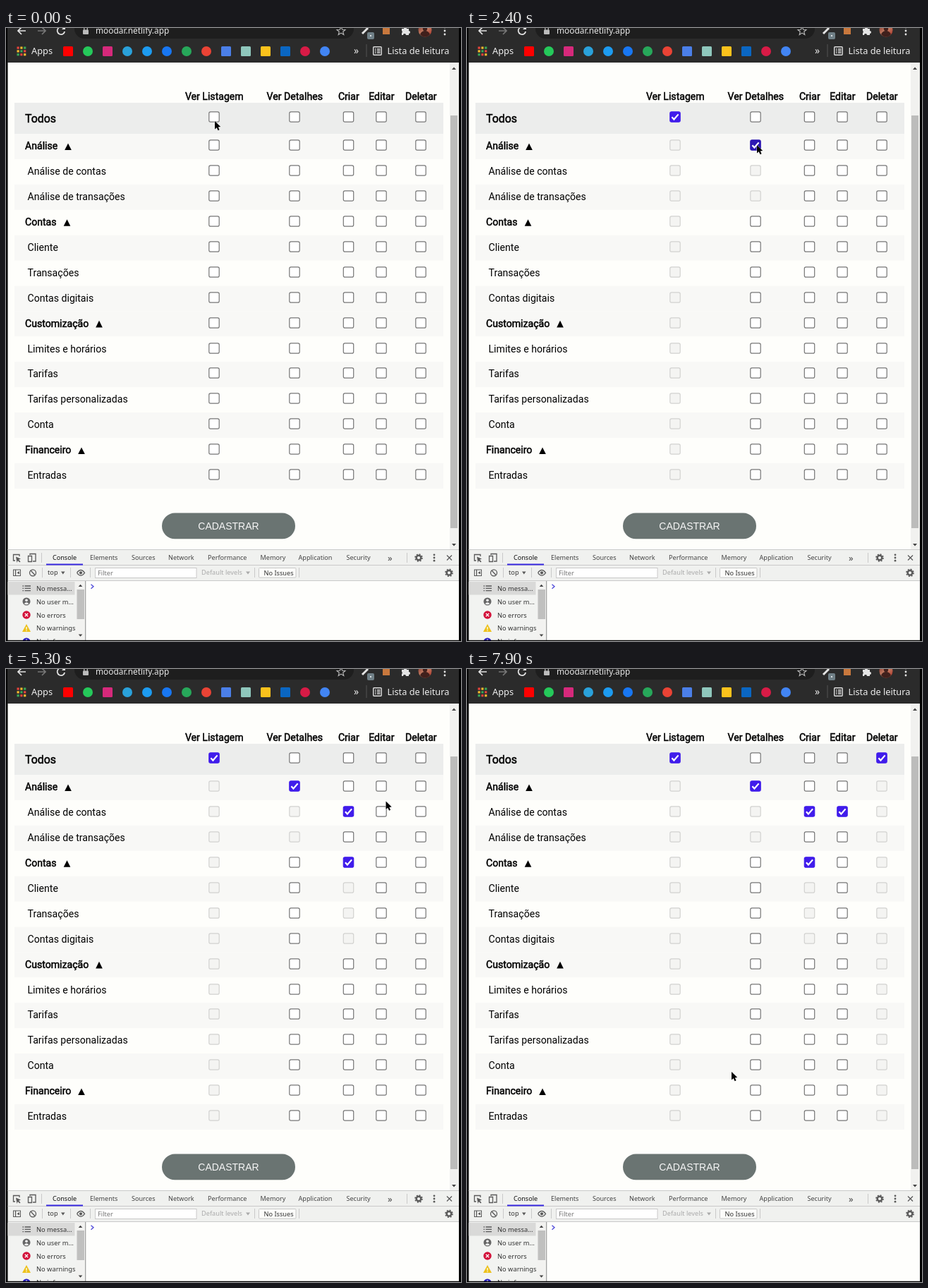
An HTML page that plays this animation: 645 by 869 pixels, repeating every 8 s.

```html
<!DOCTYPE html>
<html lang="pt">
<head>
<meta charset="utf-8">
<title>Permissões</title>
<style>
  html, body { margin: 0; width: 100%; height: 100%; overflow: hidden; background: #000; }
  svg { display: block; width: 645px; height: 869px; }
  text { white-space: pre; }
  .ui { font-family: "Noto Sans", "Open Sans", sans-serif; }
  .page { font: 14.1px Roboto, sans-serif; fill: #000; }
  .strong { stroke: #000; stroke-width: .5px; }
  .box { fill: #fff; stroke: #767676; stroke-width: 1.2px; }
  .box.hover { stroke: #4f4f4f; }
  .box.press { stroke: #a5a5a5; }
  .box.off { fill: #f4f4f2; stroke: #d2d2d0; }
  .box.on { fill: #401ceb; stroke: #401ceb; }
  .box.on.hover { fill: #2d17b3; stroke: #2d17b3; }
  .line { fill: none; stroke-width: 1.3px; }
</style>
</head>
<body>
<svg id="stage" viewBox="0 0 645 869"></svg>
<script>
const stage = document.getElementById('stage');
const columns = [295, 409, 485.5, 532, 588];
const headings = ['Ver Listagem', 'Ver Detalhes', 'Criar', 'Editar', 'Deletar'];
const arrowX = { 'Análise': 88, 'Contas': 86.5, 'Customização': 132, 'Financeiro': 107 };
const rows = ['Análise', 'Análise de contas', 'Análise de transações', 'Contas', 'Cliente',
  'Transações', 'Contas digitais', 'Customização', 'Limites e horários', 'Tarifas',
  'Tarifas personalizadas', 'Conta', 'Financeiro', 'Entradas'];
const whiteRows = [1, 3, 5, 8, 10, 12];
const boxY = row => row ? Math.round(166.2 + 35.92 * (row - 1)) : 126;

const rect = (x, y, w, h, fill, more = '') =>
  `<rect x="${x}" y="${y}" width="${w}" height="${h}" fill="${fill}" ${more}/>`;
const dot = (x, y, r, fill, more = '') => `<circle cx="${x}" cy="${y}" r="${r}" fill="${fill}" ${more}/>`;
const path = (d, fill, more = '') => `<path d="${d}" fill="${fill}" ${more}/>`;
const line = (d, color, more = '') => `<path class="line" d="${d}" stroke="${color}" ${more}/>`;
const text = (x, y, label, cls, more = '') => `<text x="${x}" y="${y}" class="${cls}" ${more}>${label}</text>`;
const ui = (x, y, label, size, fill = '#333') => text(x, y, label, 'ui', `font-size="${size}" fill="${fill}"`);
const dots = (x, y, gap, fill) => [-1, 0, 1].map(k => dot(x, y + k * gap, 1.4, fill)).join('');
const gear = (x, y) => dot(x, y, 3.3, 'none', 'stroke="#5a5a5a" stroke-width="2.4"') +
  dot(x, y, 5, 'none', 'stroke="#5a5a5a" stroke-width="1.6" stroke-dasharray="2 1.93"');

function browserBar() {
  const white = '#e4e4e4';
  let out = rect(2, 0, 640, 49, '#2b2b2b') + rect(97, -14, 396, 29, '#1e1e1e', 'rx="14"');
  out += line('M28 4H17M22 -1L17 4L22 9', white, 'style="stroke-width:1.7px"');
  out += line('M45 4H56M51 -1L56 4L51 9', '#777', 'style="stroke-width:1.7px"');
  out += line('M82.5 1A5.3 5.3 0 1 0 83.2 5', white, 'style="stroke-width:1.7px"') + path('M79 2H84V-3Z', white);
  out += rect(109, 2.5, 8, 6.5, '#bbb', 'rx="1"') + line('M110.8 3V0A2.3 2.3 0 0 1 115.3 0V3', '#bbb');
  out += ui(127, 8.3, 'moodar.netlify.app', 11.9, '#e8e8e8');
  out += path('M475 -2L476.7 2.2L481 2.5L477.7 5.2L478.8 9.5L475 7.1L471.2 9.5L472.3 5.2L469 2.5L473.3 2.2Z',
    'none', 'stroke="#bbb" stroke-width="1.1"');
  out += line('M505 8L513 0', white, 'style="stroke-width:3px"') + rect(512, 6, 10, 10, '#708087', 'rx="2"') + dot(517, 11, 1, '#fff');
  out += rect(534, 0, 10, 9, '#c8783d');
  out += path('M561 1H564A2 2 0 1 1 568 1H571V4A2 2 0 1 1 571 8V10H567A2 2 0 0 0 563 10H561V7A2 2 0 0 0 561 4Z', white);
  out += dot(594, 3, 9.5, 'url(#portrait)') + path('M587 9Q589 4 594 4T601 9Q598 12.5 594 12.5T587 9', '#40201c') + dot(594, 1, 3.2, '#40201c');
  out += dots(622, 4, 5, white);

  const gridColors = ['#e8453c', '#f9bb2d', '#3aa757'];
  for (let i = 0; i < 9; i++)
    out += rect(15.5 + i % 3 * 4.8, 26.5 + Math.floor(i / 3) * 4.8, 3.2, 3.2, gridColors[(i + Math.floor(i / 3)) % 3]);
  out += ui(36, 37, 'Apps', 12.8, '#eee');
  const marks = ['#f00s', '#25c95a', '#d6297bs', '#2aa1da', '#1d9bf0', '#1877f2', '#27a85a', '#ea4335',
    '#4b7fe8s', '#8fc7bcs', '#fbc21cs', '#0a66c2s', '#d81b46', '#4285f4'];
  marks.forEach((mark, i) => {
    const x = 88 + i * 28, color = mark.replace(/s$/, '');
    out += mark.endsWith('s') ? rect(x - 7, 26, 14, 14, color, 'rx="1.5"') : dot(x, 33, 7, color);
  });
  out += ui(493, 37, '»', 14, '#eee') + rect(510.5, 23, 1, 18, '#555');
  out += rect(520.7, 26.7, 11.5, 11.5, 'none', 'rx="1" stroke="#ddd" stroke-width="1.4"') +
    line('M523 30H524.5M526 30H530.5M523 32.5H524.5M526 32.5H530.5M523 35H524.5M526 35H530.5', '#ddd');
  return out + ui(540.5, 37, 'Lista de leitura', 12.75, '#eee');
}

function page() {
  let out = rect(2.5, 49, 639.5, 691, '#fefefb') + rect(12, 106, 608, 44, '#ecedec');
  headings.forEach((label, i) => out += text(columns[i] + .3, 102, label, 'page strong', 'text-anchor="middle"'));
  out += text(27, 134, 'Todos', 'page strong', 'style="font-size:15.9px"');
  rows.forEach((label, i) => {
    const top = 150 + 35.92 * i, base = top + 22.2, peak = arrowX[label];
    if (!whiteRows.includes(i)) out += rect(12, top, 608, 35.92, '#f8f8f6');
    out += text(peak ? 27 : 30.5, base, label, peak ? 'page strong' : 'page');
    if (peak) out += path(`M${peak - 4.8} ${base + .8}L${peak} ${base - 8.8}L${peak + 4.8} ${base + .8}Z`, '#000');
  });
  out += rect(221, 687.5, 189, 36.8, '#6a7472', 'rx="18.4"') +
    text(315.5, 710.6, 'CADASTRAR', '', 'text-anchor="middle" font-family="Liberation Sans, Arial, sans-serif" font-size="14" fill="#f6f6f6"');
  return out + rect(629, 49, 13, 691, '#f1f1ef') + rect(630, 124, 10, 585, '#bcbcbb') +
    path('M632 59H638L635 55.5ZM632 731H638L635 734.5Z', '#444');
}

function devtools() {
  const grey = '#5a5a5a', rule = '#c9c9c9';
  let out = rect(2.5, 739.5, 639.5, 44, '#f0f1ef') + rect(2.5, 739, 639.5, 1, rule) +
    rect(2.5, 761, 639.5, 1, rule) + rect(2.5, 783, 639.5, 1, rule);
  out += line('M19 749V746.5H10.5V755H13', grey) + path('M14 749.5L21 752.5L18 753.7L20.5 756.3L19.3 757.5L16.7 755L15.5 758Z', grey);
  out += line('M34 747V745.5H42V756H38M31.5 748.5H36.5V756.5H31.5Z', grey) + rect(50, 744, 1, 14, rule);
  const tabs = { Console: 66, Elements: 119, Sources: 178, Network: 230, Performance: 286, Memory: 360.5, Application: 414.5, Security: 482.5 };
  for (const name in tabs) out += ui(tabs[name], 754.3, name, 9.1, name === 'Console' ? '#111' : '#444');
  out += rect(57, 759.5, 52, 2, '#3a2be0') + ui(541, 755.5, '»', 13, '#444') + gear(585, 751) +
    rect(568, 744, 1, 14, rule) + dots(607, 751, 4.2, grey) + line('M625 747.5L632 754.5M632 747.5L625 754.5', grey);

  out += rect(10.5, 768, 10, 8.5, 'none', `stroke="${grey}"`) + line('M13.5 768V776.5', grey) + path('M19 770V774.5L15.5 772.2Z', grey);
  out += dot(38, 772.3, 4.5, 'none', `stroke="${grey}" stroke-width="1.3"`) + line('M35 769L41 775.5', grey);
  out += [51, 91, 119, 352, 415].map(x => rect(x, 765, 1, 14, rule)).join('');
  out += ui(59, 775.3, 'top', 9.2) + path('M78 770.5H83.5L80.75 774.5Z', grey);
  out += path('M100.5 772.3Q106 764.5 111.5 772.3Q106 780 100.5 772.3', 'none', `stroke="${grey}" stroke-width="1.3"`) + dot(106, 772.3, 2.1, grey);
  out += rect(126.5, 765.5, 143.5, 14, '#fff', `stroke="${rule}"`) + ui(130, 775.8, 'Filter', 9.2, '#757575');
  out += ui(277, 775.3, 'Default levels', 9.2, '#aaa') + path('M340 770.5H346L343 774.5Z', '#aaa');
  out += rect(358.5, 765.5, 52.5, 13.5, '#fcfcfa', `rx="1" stroke="${rule}"`) + ui(365.5, 775.5, 'No Issues', 9.2) + gear(628, 772.3);

  out += rect(2.5, 784, 110, 84, '#f2f3f1') + rect(2.5, 785, 95, 18.5, '#d9d9d8') + rect(113, 784, 529, 84, '#fefefc') + rect(112.5, 784, 1, 84, rule);
  ['No messa…', 'No user m…', 'No errors', 'No warnings', 'No info'].forEach((label, i) =>
    out += ui(43, 798 + i * 18.8, label, 9.3));
  out += line('M26.5 791H35M26.5 794.3H35M26.5 797.6H35M23.5 791H25M23.5 794.3H25M23.5 797.6H25', grey);
  out += dot(29, 813, 5.5, '#666') + dot(29, 811.3, 1.8, '#fff') + path('M25.7 816.2Q29 812.5 32.3 816.2Q29 818.5 25.7 816.2', '#fff');
  out += dot(29, 832, 5.7, '#d3123a') + line('M26.8 829.8L31.2 834.2M31.2 829.8L26.8 834.2', '#fff');
  out += path('M29 845L35 856H23Z', '#edc11b') + line('M29 849V852.7M29 853.7V855', '#fff');
  out += dot(29, 870, 5.5, '#2a1fc4') + rect(28.3, 866.5, 1.4, 1.4, '#fff');
  out += rect(99, 784, 13, 84, '#f2f2f0') + rect(100.5, 796, 10.5, 42, '#c0c0bf') + path('M102.7 792H108.3L105.5 788.8ZM102.7 859.5H108.3L105.5 862.7Z', '#444');
  return out + line('M120.5 788.7L124 791.7L120.5 794.7', '#4a45d8') + rect(0, 867.8, 645, 1.2, '#000');
}

let grid = '';
for (let row = 0; row <= rows.length; row++)
  columns.forEach((x, col) => {
    const y = boxY(row);
    grid += `<g data-row="${row}" data-col="${col}"><rect class="box" x="${x - 7.2}" y="${y - 7.2}" width="14.4" height="14.4" rx="2.2"/>` +
      `<path class="line tick" d="M${x - 4.6} ${y + .3}L${x - 1.6} ${y + 3.5}L${x + 4.6} ${y - 3.6}" stroke="#fff" style="stroke-width:2.2px" visibility="hidden"/></g>`;
  });

stage.innerHTML = `<defs><linearGradient id="portrait" x2="1" y2="1"><stop stop-color="#7c2a24"/><stop offset=".5" stop-color="#c98468"/>
  <stop offset="1" stop-color="#a3281f"/></linearGradient></defs>` +
  rect(0, 0, 645, 869, '#000') + browserBar() + page() + devtools() + grid +
  path('M0 0V11.6L2.7 9.2L4.6 13.2L6.6 12.3L4.8 8.4L8.2 8.1Z', '#000', 'id="cursor" stroke="#fff" stroke-width=".8" paint-order="stroke"');

const clicks = [
  { row: 0, col: 0, press: 200, on: 600, last: 14 },
  { row: 1, col: 1, press: 2200, on: 2400, last: 3 },
  { row: 4, col: 2, press: 3600, on: 3800, last: 7 },
  { row: 2, col: 2, press: 4800, on: 5000, last: 2 },
  { row: 2, col: 3, press: 6100, on: 6300, last: 2 },
  { row: 0, col: 4, press: 6700, on: 7200, last: 14 },
];
// time, x, y of the pointer tip
const track = [
  [0, 296, 132], [900, 296, 132], [1300, 393, 178], [1400, 415, 177], [1500, 419, 173], [1700, 417, 167],
  [1800, 417, 167], [2000, 411, 166], [2700, 411, 166], [3100, 452, 240], [3300, 482, 282], [3400, 481, 275],
  [4000, 481, 275], [4400, 487, 201], [5200, 487, 201], [5300, 538.5, 187.5], [5400, 552, 189], [5900, 530.5, 201],
  [6300, 530.5, 201], [6600, 586, 132], [6700, 588, 129], [7500, 588, 129], [7600, 407, 484],
  [7700, 486, 296], [7800, 486, 296], [7900, 375, 571], [8000, 375, 571],
];

function pointerAt(time) {
  const next = Math.max(1, track.findIndex(p => p[0] > time));
  const [a, b] = [track[next - 1], track[next]];
  const k = (time - a[0]) / (b[0] - a[0]);
  return [a[1] + (b[1] - a[1]) * k, a[2] + (b[2] - a[2]) * k];
}

const cursor = document.getElementById('cursor');
const cells = [...stage.querySelectorAll('g[data-row]')].map(g => ({
  row: +g.dataset.row, col: +g.dataset.col, box: g.firstChild, tick: g.lastChild,
}));

function draw() {
  const time = Math.floor(performance.now() % 8000 / 100) * 100;
  const [x, y] = pointerAt(time);
  cursor.setAttribute('transform', `translate(${x} ${y})`);
  for (const { row, col, box, tick } of cells) {
    const own = clicks.find(c => c.row === row && c.col === col);
    const on = own && time >= own.on;
    const off = clicks.some(c => c.col === col && time >= c.on && row > c.row && row <= c.last);
    const press = own && time >= own.press && !on;
    const hover = Math.abs(x - columns[col]) < 8 && Math.abs(y - boxY(row)) < 8 && time >= 200;
    box.setAttribute('class', 'box' + (off ? ' off' : on ? ' on' : '') + (press ? ' press' : hover && !off ? ' hover' : ''));
    tick.setAttribute('visibility', on ? 'visible' : 'hidden');
  }
  requestAnimationFrame(draw);
}
draw();
</script>
</body>
</html>
```
